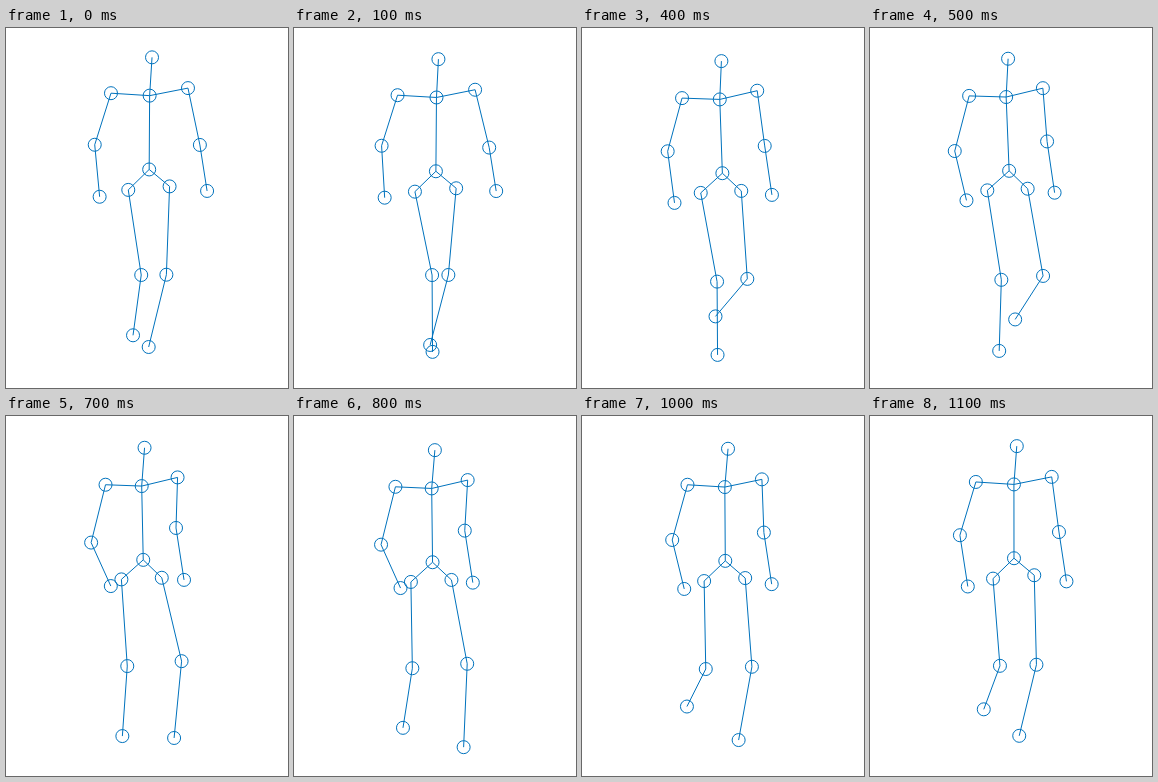
Recreate the animation shown at these times as an HTML page. Size 282 px wide and 360 px high, loop 1.2 s.

```html
<!DOCTYPE html>
<html lang="en">
<head>
<meta charset="utf-8">
<title>Walking skeleton</title>
<style>
  html, body { margin: 0; width: 100%; height: 100%; overflow: hidden; background: #fff; }
  svg { display: block; width: 282px; height: 360px; }
  path { fill: none; stroke: #0072bd; stroke-width: 1; stroke-linejoin: round; }
</style>
</head>
<body>
<svg viewBox="0 0 282 360"><path id="body"/></svg>
<script>
const STEPS = 12, STEP_MS = 100, RADIUS = 6.5;

// A mean plus one swing per stride (c1, s1) and one per footfall (c2, s2).
const wave = (mean, c1 = 0, s1 = 0, c2 = 0, s2 = 0) => a =>
  mean + c1 * Math.cos(a) + s1 * Math.sin(a) + c2 * Math.cos(2 * a) + s2 * Math.sin(2 * a);

const vector = (x, y) => a => [x(a), y(a)];
const add = ([x, y], [dx, dy], k = 1) => [x + k * dx, y + k * dy];

// Trunk: sway across, bob up and down.
const neckAt = vector(wave(139.7, 4.2, -0.5, -0.27, -0.55), wave(70.5, -0.35, 0, -2.5, 0.6));
const headBone = vector(wave(2.4, 0, -0.9), wave(-38.3));
const spine = vector(wave(1, -1.45, 0.4, 0, -0.6), wave(73.8));

// Girdles: a centre and half a bar that turns with the stride.
const chest = vector(wave(-0.15), wave(-5));
const shoulderBar = vector(wave(37.4, 1.1, 0.85), wave(-3.2, 0.65, -0.2));
const seat = vector(wave(-1, 0.75), wave(18.7));
const hipBar = vector(wave(20.4, 0.25), wave(-1.25, -0.5));

// Both sides share their vertical motion, half a stride apart.
const upperArmY = wave(54.2, -2.65, -2.7);
const forearmY = wave(49, 3, 3.25, 0, -1.5);
const thighY = wave(86.7, -1.6, -0.5, 0, -1.9);
const shinY = wave(64.4, -6, 17.2, 1.9, 9.3);

const left = {
  side: -1,
  phase: 0,
  arm: [vector(wave(-15, -0.9, 0, -0.35), upperArmY),
        vector(wave(10.4, -5.9, -6.4, 0.4, 0.9), forearmY)],
  leg: [vector(wave(10.25, 1.2, 9.2, 1.5, 0.6), thighY),
        vector(wave(-5.7, -2.5, 9.7, 0, 4), shinY)]
};

const right = {
  side: 1,
  phase: Math.PI,
  arm: [vector(wave(5.5, -5.4, -6.3, 1, 0.3), upperArmY),
        vector(wave(7.5, 0.3, 0.5), forearmY)],
  leg: [vector(wave(6.2, 11.8, 7.2, 2.4, -1.6), thighY),
        vector(wave(-17.7, 0, 10.7, 0, 5.6), shinY)]
};

// Joints from the root of a limb to its tip.
function limb(root, bones, a) {
  const joints = [root];
  for (const bone of bones) joints.push(add(joints.at(-1), bone(a)));
  return joints;
}

function pose(a) {
  const neck = neckAt(a);
  const head = add(neck, headBone(a));
  const pelvis = add(neck, spine(a));
  const chestAt = add(neck, chest(a));
  const seatAt = add(pelvis, seat(a));
  const [leftSide, rightSide] = [left, right].map(({ side, phase, arm, leg }) => ({
    arm: limb(add(chestAt, shoulderBar(a), side), arm, a + phase),
    leg: limb(add(seatAt, hipBar(a), side), leg, a + phase)
  }));
  return {
    chains: [
      [head, neck, pelvis],
      [...leftSide.arm.toReversed(), neck, ...rightSide.arm],
      [...leftSide.leg.toReversed(), pelvis, ...rightSide.leg]
    ],
    joints: [head, neck, pelvis,
      ...leftSide.arm, ...rightSide.arm, ...leftSide.leg, ...rightSide.leg]
  };
}

const point = ([x, y]) => x.toFixed(2) + ' ' + y.toFixed(2);

function circle([x, y]) {
  const arc = dx => `a${RADIUS} ${RADIUS} 0 1 1 ${dx} 0`;
  return 'M' + point([x - RADIUS, y]) + arc(2 * RADIUS) + arc(-2 * RADIUS) + 'z';
}

const body = document.getElementById('body');
let shown = -1;

function draw() {
  const step = Math.floor(performance.now() / STEP_MS) % STEPS;
  if (step !== shown) {
    shown = step;
    const { chains, joints } = pose(step / STEPS * 2 * Math.PI);
    const bones = chains.map(chain => 'M' + chain.map(point).join('L'));
    body.setAttribute('d', bones.concat(joints.map(circle)).join(''));
  }
  requestAnimationFrame(draw);
}
draw();
</script>
</body>
</html>
```
